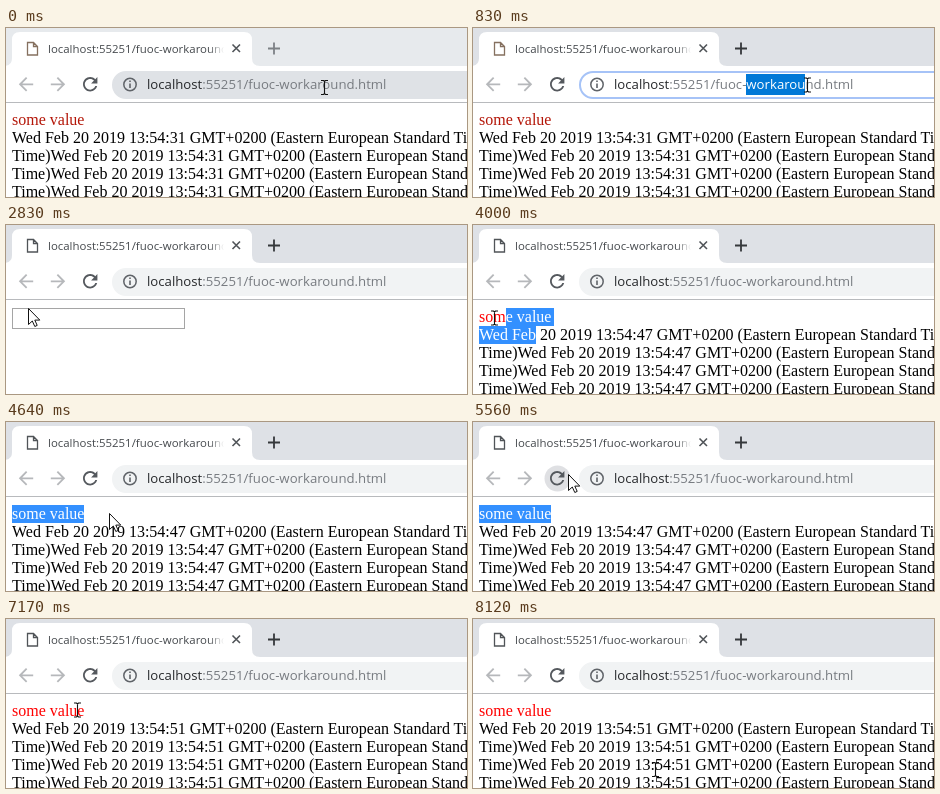
Write an HTML page that moves like this. It is 461x169 px and loops after 8190 ms.

```html
<!DOCTYPE html>
<html lang="en">
<head>
<meta charset="utf-8">
<title>Page reload</title>
<style>
  html, body { margin: 0; width: 100%; height: 100%; overflow: hidden; background: #fff; }
  svg { display: block; width: 461px; height: 169px; }
  text { white-space: pre; }
  .ui { font-family: "Open Sans", "Noto Sans", sans-serif; }
  .page { font: 16px "Liberation Serif", "Times New Roman", serif; }
</style>
</head>
<body>
<svg viewBox="0 0 461 169" xmlns="http://www.w3.org/2000/svg">
  <defs>
    <linearGradient id="fade" gradientUnits="userSpaceOnUse" x1="203" x2="218" y1="0" y2="0">
      <stop offset="0" stop-color="#45494d"/>
      <stop offset="1" stop-color="#45494d" stop-opacity="0"/>
    </linearGradient>
  </defs>
  <rect width="461" height="169" fill="#fff"/>

  <!-- tab strip -->
  <rect id="strip" width="461" height="38"/>
  <path d="M-2 38Q6 38 6 30V12Q6 4 14 4H238Q246 4 246 12V30Q246 38 254 38Z" fill="#fff"/>
  <path id="icon" d="M21.5 14.5h6l4 4v8.5h-10zM27.5 14.5v4h4" fill="none" stroke-width="1.3"/>
  <text class="ui" x="42" y="24.5" font-size="11.45" fill="url(#fade)">localhost:55251/fuoc-workaround</text>
  <path d="M226.5 16.5l7.5 7.5m0-7.5l-7.5 7.5" stroke="#505458" stroke-width="1.6"/>
  <path id="plus" d="M262 20.5h12m-6-6v12" stroke-width="1.8"/>

  <!-- toolbar -->
  <rect y="74" width="461" height="1" fill="#b8babd"/>
  <circle id="hover" cx="84.5" cy="56.5" r="13" fill="#dfe0e3"/>
  <g fill="#b6b8bb">
    <path transform="translate(9.2 45.5) scale(.9)" d="M20 11H7.83l5.59-5.59L12 4l-8 8 8 8 1.41-1.41L7.83 13H20z"/>
    <path transform="translate(62.8 45.5) scale(-.9 .9)" d="M20 11H7.83l5.59-5.59L12 4l-8 8 8 8 1.41-1.41L7.83 13H20z"/>
  </g>
  <path transform="translate(73.4 45.5) scale(.9)" fill="#55595e" d="M17.65 6.35C16.2 4.9 14.21 4 12 4c-4.42 0-7.99 3.58-7.99 8s3.57 8 7.99 8c3.73 0 6.84-2.55 7.73-6h-2.08c-.82 2.33-3.04 4-5.65 4-3.31 0-6-2.69-6-6s2.69-6 6-6c1.66 0 3.14.69 4.22 1.78L13 11h7V4z"/>
  <rect id="pill" x="107" y="44" width="400" height="26" rx="13" stroke-width="2"/>
  <circle cx="124" cy="56.5" r="6.2" fill="none" stroke="#5f6368" stroke-width="1.5"/>
  <path d="M124 55.5v4.5m0-7.5v1.6" stroke="#5f6368" stroke-width="1.6"/>
  <text id="url" class="ui" x="141" y="61" font-size="13.2" fill="#777b80"><tspan fill="#26282b">localhost</tspan>:55251/fuoc-workaround.html</text>

  <!-- page -->
  <rect id="field" x="6.5" y="83.5" width="172" height="20" fill="#fff" stroke="#a5a5a5"/>
  <g id="page" class="page">
    <text id="value" x="6" y="97">some value</text>
    <text id="line0" x="6" y="115"></text>
    <text id="line1" x="6" y="133"></text>
    <text id="line2" x="6" y="151"></text>
    <text id="line3" x="6" y="169"></text>
  </g>
  <g id="marks"></g>

  <!-- pointers -->
  <path id="arrow" d="M.5.5V16.5L4.3 13L6.8 18.5L9.2 17.4L6.8 12.1H11.8Z" fill="#fff" stroke="#111"/>
  <path id="beam" d="M-3.5-7h2.5l1 1 1-1h2.5M0-6.5V6.5M-3.5 7h2.5l1-1 1 1h2.5" fill="none" stroke="#111" stroke-width="1.1"/>
</svg>
<script>
const LOOP = 8190;
const FOCUS = 600;
const RELOAD = 2210;
const NS = 'http://www.w3.org/2000/svg';
const $ = id => document.getElementById(id);
const set = (el, attrs) => { for (const k in attrs) el.setAttribute(k, attrs[k]); };
const show = (el, on) => set(el, { display: on ? 'inline' : 'none' });

// Pointer moves: first step, last step, step count, end x, end y, shape
const START = { x: 318.5, y: 59.5, shape: 'beam' };
const MOVES = [
  [70, 280, 4, 275.5, 57, 'beam'],
  [600, 830, 4, 334.5, 57, 'beam'],
  [990, 1140, 3, 343, 53, 'beam'],
  [1450, 1760, 5, 112, 55, 'beam'],
  [1835, 1910, 2, 88, 50, 'arrow'],
  [2520, 2832, 5, 22, 83, 'arrow'],
  [2910, 2910, 1, 18, 89, 'arrow'],
  [3060, 3290, 4, 32, 92, 'beam'],
  [3370, 3520, 3, 54.5, 103, 'beam'],
  [3690, 3760, 2, 34.5, 100, 'beam'],
  [3930, 4000, 2, 21.5, 93, 'beam'],
  [4080, 4080, 1, 9.5, 93, 'beam'],
  [4230, 4560, 5, 103, 93, 'beam'],
  [4640, 4640, 1, 103, 91, 'arrow'],
  [5100, 5560, 7, 95, 52, 'arrow'],
  [6250, 6480, 4, 22, 88, 'arrow'],
  [6630, 7170, 8, 71.5, 91, 'beam'],
  [7800, 8120, 5, 182.5, 150.5, 'beam']
];

// Selected characters from a given time: [time, {text id: [from, to, extra width]}]
const SELECTIONS = [
  [0, {}],
  [FOCUS, { url: [21, 23] }],
  [677, { url: [21, 25] }],
  [753, { url: [21, 27] }],
  [830, { url: [21, 29] }],
  [990, { url: [21, 30] }],
  [1140, { url: [21, 31] }],
  [RELOAD, {}],
  [3370, { value: [3, 4] }],
  [3445, { value: [3, 6] }],
  [3520, { value: [3, 10, 3], line0: [0, 7] }],
  [4080, {}],
  [4230, { value: [0, 3] }],
  [4312, { value: [0, 5] }],
  [4395, { value: [0, 8] }],
  [4477, { value: [0, 10] }],
  [5940, {}]
];

// Page loads: [time, seconds on the clock], null while only the field shows
const LOADS = [[0, 31], [RELOAD, null], [3060, 47], [5940, null], [6630, 51]];

const latest = (list, t) => list.filter(item => item[0] <= t).pop()[1];

function pointerAt(t) {
  let p = START;
  for (const [t0, t1, n, x, y, shape] of MOVES) {
    if (t < t0) break;
    const step = t1 > t0 ? Math.floor((t - t0) / (t1 - t0) * (n - 1)) + 1 : n;
    const f = Math.min(1, step / n);
    p = { x: p.x + (x - p.x) * f, y: p.y + (y - p.y) * f, shape };
  }
  return p;
}

// Coloured box with a clipped white copy of the text on top
function makeMark(id, y, height, color) {
  const add = (parent, name, attrs) => {
    const el = document.createElementNS(NS, name);
    set(el, attrs);
    return parent.appendChild(el);
  };
  const source = $(id);
  const group = add($('marks'), 'g', { class: id === 'url' ? 'ui' : 'page' });
  const box = add(group, 'rect', { y, height, fill: color });
  const clip = add(add(group, 'clipPath', { id: id + 'Clip' }), 'rect', { y, height });
  const holder = add(group, 'g', { 'clip-path': `url(#${id}Clip)` });
  const copy = add(holder, 'text', { x: source.getAttribute('x'), y: source.getAttribute('y'), fill: '#fff' });
  if (id === 'url') set(copy, { 'font-size': source.getAttribute('font-size') });
  return range => {
    show(group, !!range);
    if (!range) return;
    const [from, to, extra = 0] = range;
    const x = Math.round(source.getStartPositionOfChar(from).x);
    const width = Math.round(source.getEndPositionOfChar(to - 1).x + extra) - x;
    copy.textContent = source.textContent;
    set(box, { x, width });
    set(clip, { x, width });
  };
}

const marks = {
  url: makeMark('url', 46, 21, '#0078d7'),
  value: makeMark('value', 83, 18, '#3390ff'),
  line0: makeMark('line0', 101, 18, '#3390ff')
};

// The window wakes up and the address bar takes focus on the first click
function drawChrome(t) {
  const idle = t < FOCUS;
  const focused = !idle && t < RELOAD;
  const fill = idle ? '#dfe2e6' : focused ? '#fff' : '#f1f3f4';
  set($('strip'), { fill: idle ? '#e7eaed' : '#dee1e6' });
  set($('plus'), { stroke: idle ? '#7d8185' : '#35383b' });
  set($('icon'), { stroke: t < RELOAD ? '#85705f' : '#505458' });
  set($('pill'), { fill, stroke: focused ? '#a6c3f7' : fill });
}

function draw(time) {
  const t = time % LOOP + 6;
  const seconds = latest(LOADS, t);
  drawChrome(t);

  show($('field'), seconds === null);
  show($('page'), seconds !== null);
  if (seconds !== null) {
    const stamp = `Wed Feb 20 2019 13:54:${seconds} GMT+0200 (Eastern European Standard `;
    for (let i = 0; i < 4; i++) $('line' + i).textContent = i ? 'Time)' + stamp : stamp + 'Time)';
    set($('value'), { fill: seconds === 31 ? '#b41608' : '#f00' });
  }

  const selected = latest(SELECTIONS, t);
  for (const id in marks) marks[id](selected[id]);

  const p = pointerAt(t);
  for (const shape of ['arrow', 'beam']) {
    show($(shape), p.shape === shape);
    set($(shape), { transform: `translate(${p.x} ${p.y})` });
  }
  show($('hover'), p.shape === 'arrow' && Math.abs(p.x - 84) < 14 && Math.abs(p.y - 56) < 14);
}

const begin = performance.now();
function tick() {
  draw(performance.now() - begin);
  requestAnimationFrame(tick);
}
tick();
</script>
</body>
</html>
```
